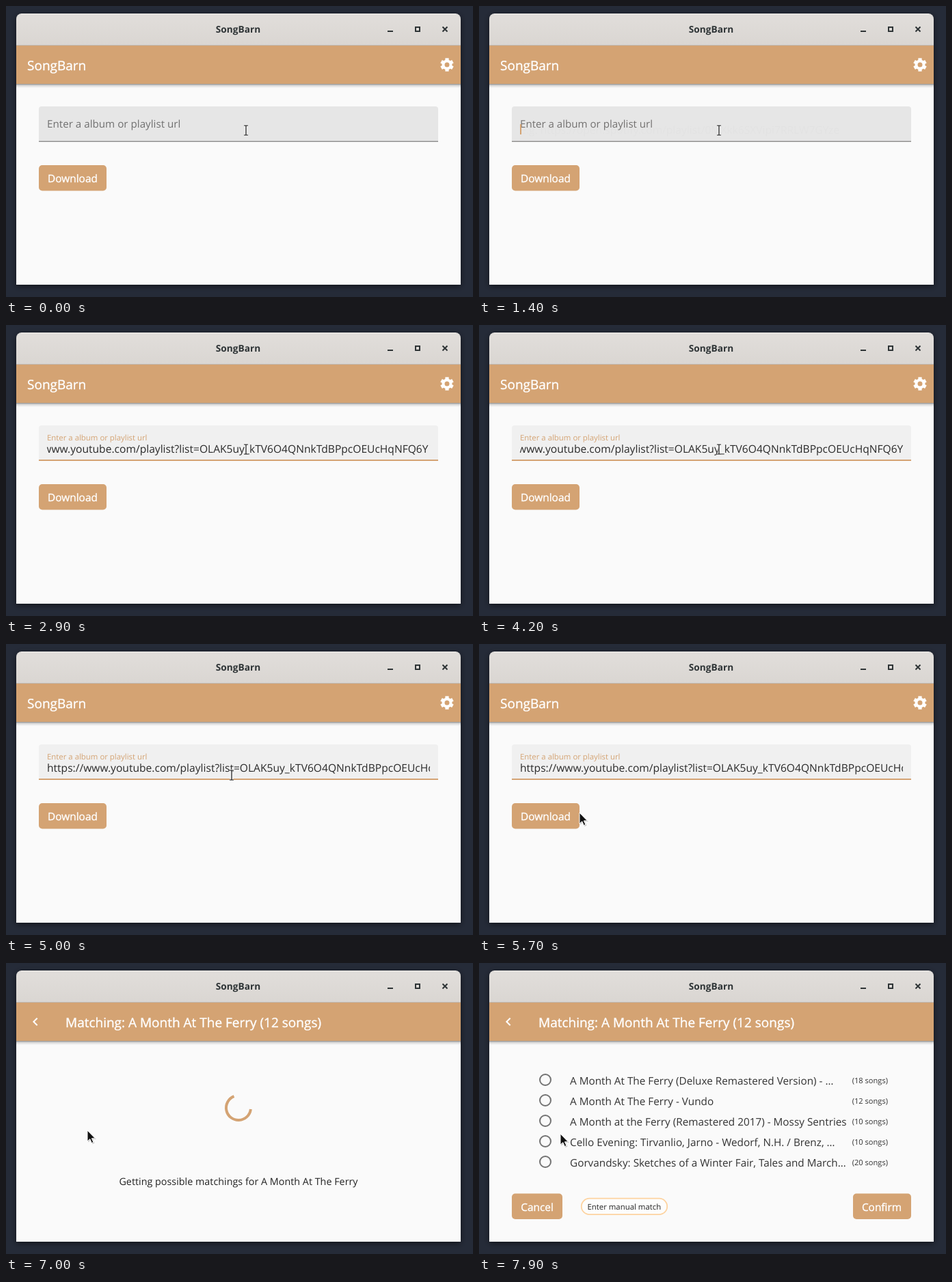
Recreate the animation shown at these times as an HTML page. Size 683 px wide and 426 px high, loop 8000 ms.

```html
<!DOCTYPE html>
<html lang="en">
<head>
<meta charset="utf-8">
<title>SongBarn</title>
<style>
  html, body { margin: 0; width: 100%; height: 100%; overflow: hidden; background: #252b38; }
  svg { display: block; width: 100%; height: 100%; }
  text { font-family: "Open Sans", "Noto Sans", sans-serif; text-rendering: geometricPrecision; white-space: pre; }
  .heading, .button { fill: #fff; stroke: #fff; stroke-width: .35px; }
  .heading { font-size: 19px; }
  .button { font-size: 15.4px; text-anchor: middle; }
  .input { font-size: 15.6px; }
  .row { font-size: 15.3px; fill: #333; }
  .count { font-size: 11.1px; fill: #333; text-anchor: end; }
</style>
</head>
<body>
<svg viewBox="0 0 683 426" preserveAspectRatio="none">
  <defs>
    <linearGradient id="titlebar" gradientUnits="userSpaceOnUse" x1="0" y1="11" x2="0" y2="57">
      <stop stop-color="#e1dedb"/><stop offset="1" stop-color="#dad6d2"/>
    </linearGradient>
    <linearGradient id="shade" x2="0" y2="1">
      <stop stop-opacity=".42"/><stop offset=".4" stop-opacity=".14"/><stop offset="1" stop-opacity="0"/>
    </linearGradient>
    <filter id="glow" x="-5%" y="-5%" width="110%" height="112%">
      <feDropShadow dx="0" dy="2" stdDeviation="4" flood-opacity=".55"/>
    </filter>
    <clipPath id="content"><rect x="15" y="58" width="650" height="350"/></clipPath>
    <clipPath id="inputBox"><rect x="60" y="168" width="560" height="28"/></clipPath>
    <g id="paper">
      <rect x="15" y="58" width="650" height="350" fill="#fafafa"/>
      <rect x="15" y="58" width="650" height="56" fill="#d4a373"/>
      <rect x="15" y="114" width="650" height="6" fill="url(#shade)"/>
    </g>
  </defs>

  <rect width="683" height="426" fill="#252b38"/>
  <path d="M15 408V19a8 8 0 0 1 8-8H657a8 8 0 0 1 8 8V408z" fill="url(#titlebar)" filter="url(#glow)"/>
  <path d="M22 11.5H658" stroke="#efedea"/>
  <path d="M15 57.5H665" stroke="#bfb8b1"/>
  <text x="339.5" y="39" text-anchor="middle" font-size="13.7" font-weight="700" fill="#2e3436">SongBarn</text>
  <g fill="none" stroke="#2e3436" stroke-width="2">
    <path d="M558 37h8M638.5 30.5l7 7m0-7l-7 7"/>
    <rect x="599" y="31" width="6" height="6"/>
  </g>

  <g clip-path="url(#content)">
    <g id="home">
      <use href="#paper"/>
      <text class="heading" x="31" y="94">SongBarn</text>
      <g id="gear" transform="translate(645 86)" fill="none" stroke="#fff">
        <circle r="5.5" stroke-width="4"/>
      </g>
      <path id="fill" d="M48 199V151a4 4 0 0 1 4-4H628a4 4 0 0 1 4 4V199z"/>
      <rect id="line" x="48" width="584"/>
      <text id="label" font-size="15.2">Enter a album or playlist url</text>
      <text id="hint" class="input" x="60" y="187" fill="#707070">e.g. https://open.spotify.com/playlist/0MXkk6SXVipi7RRLW7GYze</text>
      <g clip-path="url(#inputBox)">
        <text id="url" class="input" y="187" fill="#2b2b2b">https://www.youtube.com/playlist?list=OLAK5uy_kTV6O4QNnkTdBPpcOEUcHqNFQ6Y</text>
      </g>
      <rect id="caret" width="2" fill="#d4a373"/>
      <rect x="48" y="233" width="99" height="37.5" rx="5" fill="#d4a373"/>
      <text class="button" x="97.5" y="258">Download</text>
    </g>

    <g id="match">
      <use href="#paper"/>
      <path d="M45.700 80.700L40.400 86L45.700 91.300" fill="none" stroke="#fff" stroke-width="2"/>
      <text class="heading" x="87" y="94">Matching: A Month At The Ferry (12 songs)</text>
      <g id="loading">
        <path id="spinner" fill="none" stroke="#d4a373" stroke-width="4"/>
        <text x="340" y="325" text-anchor="middle" font-size="14.35" fill="#222">Getting possible matchings for A Month At The Ferry</text>
      </g>
      <g id="results">
        <g id="rows"></g>
        <rect x="48" y="337.5" width="74" height="37.5" rx="5" fill="#d4a373"/>
        <text class="button" x="85" y="363">Cancel</text>
        <rect x="149.8" y="344.6" width="125.400" height="23.500" rx="11.7" fill="#fdfdfd" stroke="#fdd3a0" stroke-width="1.8"/>
        <text x="212.3" y="361" text-anchor="middle" font-size="11.4" fill="#222">Enter manual match</text>
        <rect x="547" y="337.5" width="85" height="37.5" rx="5" fill="#d4a373"/>
        <text class="button" x="589" y="363">Confirm</text>
      </g>
    </g>
  </g>

  <g id="beam" fill="none">
    <path d="M-3-7H3M0-7V7M-3 7H3" stroke="#fff" stroke-width="3" stroke-opacity=".85"/>
    <path d="M-3-7H3M0-7V7M-3 7H3" stroke="#111" stroke-width="1.2"/>
  </g>
  <g id="arrow" stroke-linejoin="round">
    <path d="M1 1V17.500l4-3.500 2.500 6 3-1.300-2.500-5.700h5z" opacity=".2"/>
    <path d="M0 0V16l3.800-3.300 2.500 5.800 2.600-1.100-2.500-5.600h5z" fill="#111" stroke="#fff" stroke-width="1"/>
  </g>
</svg>

<script>
const LOOP = 8000, STEP = 100, ROUTE = 6570;
const el = Object.fromEntries([...document.querySelectorAll('svg [id]')].map(e => [e.id, e]));
const set = (node, attrs) => { for (const k in attrs) node.setAttribute(k, attrs[k]); };
const show = (node, on) => { node.style.display = on ? '' : 'none'; };
const clamp = v => Math.min(1, Math.max(0, v));
const mix = (a, b, p) => a + (b - a) * p;
const blend = (a, b, p) => `color-mix(in srgb, ${b} ${p * 100}%, ${a})`;

// Cubic Bezier easing, solved by bisection
function bezier(x1, y1, x2, y2) {
  const at = (a, b, u) => 3 * (1 - u) ** 2 * u * a + 3 * (1 - u) * u * u * b + u ** 3;
  return x => {
    let lo = 0, hi = 1;
    for (let i = 0; i < 24; i++) {
      const mid = (lo + hi) / 2;
      if (at(x1, x2, mid) < x) lo = mid; else hi = mid;
    }
    return at(y1, y2, (lo + hi) / 2);
  };
}
const swift = bezier(.4, 0, .2, 1), easeIn = bezier(.42, 0, 1, 1);

el.gear.innerHTML += [0, 60, 120, 180, 240, 300].map(a =>
  `<path d="M0-6V-9.700" stroke-width="5.200" transform="rotate(${a})"/>`).join('');

el.rows.innerHTML = [
  ['A Month At The Ferry (Deluxe Remastered Version) - …', 18],
  ['A Month At The Ferry - Vundo', 12],
  ['A Month at the Ferry (Remastered 2017) - Mossy Sentries', 10],
  ['Cello Evening: Tirvanlio, Jarno - Wedorf, N.H. / Brenz, …', 10],
  ['Gorvandsky: Sketches of a Winter Fair, Tales and March…', 20],
].map(([name, songs], i) => `<g transform="translate(0 ${i * 30})">
  <circle cx="97" cy="171" r="8" fill="none" stroke="#737373" stroke-width="2"/>
  <text class="row" x="133" y="178">${name}</text>
  <text class="count" x="598" y="176">(${songs} songs)</text></g>`).join('');

const pointerPath = [
  [0, 351, 182], [4800, 351, 182], [5000, 330, 192], [5300, 250, 222], [5500, 185, 252],
  [5700, 147, 247], [5800, 114, 245], [5900, 119, 245], [7600, 119, 245], [7900, 119, 250],
];
const caretTimes = [[1400, 1900], [2400, 2900], [3400, 3900], [4300, 4700], [5200, 5700], [6200, 6600]];

function drawField(t) {
  const focus = swift(clamp((t - 1380) / 200));
  const active = t < 6600 ? focus : 0;
  const pasted = t >= 2400, atEnd = t >= 2500 && t < 4300;
  set(el.fill, { fill: blend('#e6e6e6', '#f0f0f0', focus) });
  const thick = mix(1.4, 2, active);
  set(el.line, { y: 199 - thick, height: thick, fill: blend('#8c8c8c', '#d4a373', active) });
  set(el.label, {
    transform: `translate(60 ${mix(178, 169, focus)}) scale(${mix(1, .75, focus)})`,
    fill: blend('#707070', '#d4a373', active),
  });
  set(el.hint, { opacity: pasted ? 0 : focus });
  show(el.url, pasted);
  set(el.url, { x: atEnd ? (t < 4200 ? 617.5 : 620.3) : 60, 'text-anchor': atEnd ? 'end' : 'start' });
  show(el.caret, caretTimes.some(([on, off]) => t >= on && t < off));
  set(el.caret, { x: atEnd ? 618 : 60, y: pasted ? 171 : 173, height: pasted ? 19 : 15 });
}

function drawMatch(t) {
  const p = clamp((t - ROUTE) / 300);
  show(el.match, p > 0);
  set(el.match, { opacity: easeIn(p), transform: `translate(0 ${87.5 * (1 - swift(p))})` });
  show(el.loading, t < 7100);
  show(el.results, t >= 7100);

  const elapsed = Math.max(0, t - ROUTE - 10), phase = elapsed / 1333 % 1;
  const head = swift(clamp(phase * 2)), tail = swift(clamp(phase * 2 - 1));
  const start = 2 * Math.PI * elapsed / 2222 + Math.PI / 2 * phase + 1.5 * Math.PI * tail;
  const sweep = Math.max(.001, 1.5 * Math.PI * (head - tail));
  const at = a => `${340 + 18 * Math.sin(a)} ${212 - 18 * Math.cos(a)}`;
  set(el.spinner, { d: `M${at(start)}A18 18 0 ${+(sweep > Math.PI)} 1 ${at(start + sweep)}` });
}

function drawPointer(t) {
  const i = pointerPath.findLastIndex(k => k[0] <= t);
  const a = pointerPath[i], b = pointerPath[i + 1] || a;
  const p = a === b ? 0 : (t - a[0]) / (b[0] - a[0]);
  const x = mix(a[1], b[1], p), y = mix(a[2], b[2], p);
  show(el.beam, y < 199);
  show(el.arrow, y >= 199);
  for (const node of [el.beam, el.arrow]) set(node, { transform: `translate(${x} ${y})` });
}

const origin = performance.now();
function frame() {
  const now = Math.max(0, performance.now() - origin) % LOOP;
  const t = Math.floor(now / STEP) * STEP;
  drawField(t);
  drawMatch(t);
  drawPointer(t);
  requestAnimationFrame(frame);
}
frame();
</script>
</body>
</html>
```
